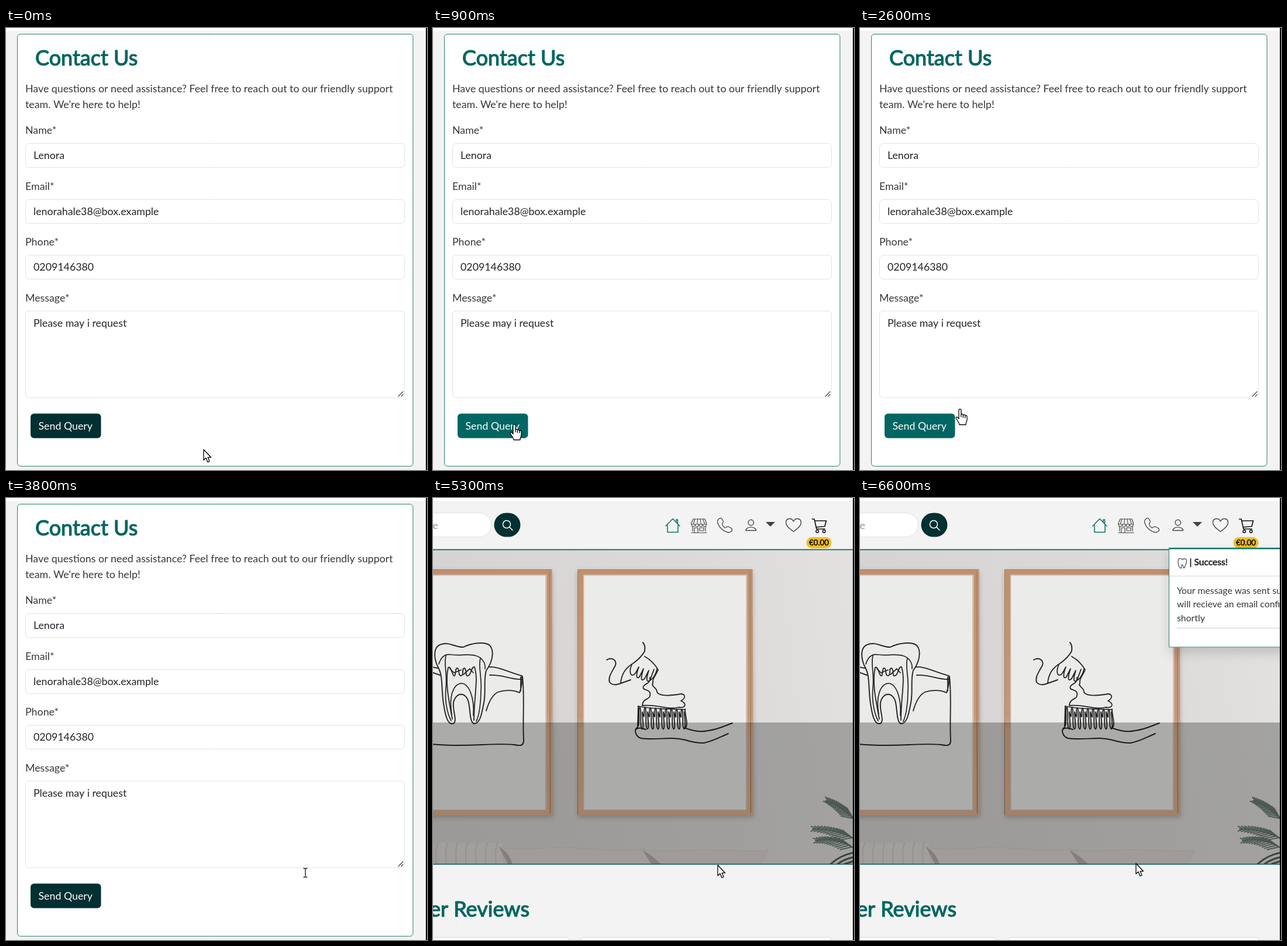
Animation of 720x756 px, one loop 7200 ms. Source, as an HTML page with a canvas:

```html
<!DOCTYPE html>
<html lang="en">
<head>
<meta charset="utf-8">
<title>Contact form</title>
<style>
html, body { margin: 0; width: 100%; height: 100%; overflow: hidden; background: #f3f3f3; }
canvas { display: block; width: 720px; height: 756px; }
</style>
</head>
<body>
<canvas id="stage" width="720" height="756"></canvas>
<script>
const ctx = document.getElementById('stage').getContext('2d');
const LOOP = 7200, STEP = 100, PAGE_SWITCH = 5300;
const TEAL = '#006660', DARK = '#003032', INK = '#212529', PAGE = '#f3f3f3';

const clamp = v => Math.max(0, Math.min(1, v));
const ramp = (t, a, b) => clamp((t - a) / (b - a));
const smooth = u => u * u * (3 - 2 * u);
const lerp = (a, b, u) => a + (b - a) * u;

function rect(x, y, w, h, fill) {
  ctx.fillStyle = fill;
  ctx.fillRect(x, y, w, h);
}

function box(x, y, w, h, r, fill, line) {
  ctx.beginPath();
  ctx.roundRect(x, y, w, h, r);
  ctx.fillStyle = fill;
  ctx.fill();
  if (line) {
    ctx.strokeStyle = line;
    ctx.lineWidth = 1;
    ctx.stroke();
  }
}

function text(str, x, y, size = 17.8, color = INK, bold = 0, align = 'left') {
  ctx.font = `400 ${size}px Lato, sans-serif`;
  ctx.textAlign = align;
  ctx.fillStyle = ctx.strokeStyle = color;
  ctx.fillText(str, x, y);
  if (bold) {
    ctx.lineWidth = bold;
    ctx.lineJoin = 'round';
    ctx.strokeText(str, x, y);
  }
}

function path(d, line, width = 1.5, fill) {
  const p = new Path2D(d);
  ctx.lineCap = ctx.lineJoin = 'round';
  if (fill) { ctx.fillStyle = fill; ctx.fill(p); }
  if (line) { ctx.strokeStyle = line; ctx.lineWidth = width; ctx.stroke(p); }
}

function shadowed(color, blur, dy, draw) {
  ctx.save();
  ctx.shadowColor = color;
  ctx.shadowBlur = blur;
  ctx.shadowOffsetY = dy;
  draw();
  ctx.restore();
}

// Contact form

function drawForm(t) {
  box(19.5, 10.5, 676.5, 739, 5, '#fff', '#2b8274');
  text('Contact Us', 50, 64, 36, TEAL, 1.2);
  text('Have questions or need assistance? Feel free to reach out to our friendly support', 33, 110, 17.8, '#33383c');
  text("team. We're here to help!", 33, 137, 17.8, '#33383c');

  const fields = [['Name*', 'Lenora'], ['Email*', 'lenorahale38@box.example'], ['Phone*', '0209146380']];
  fields.forEach(([label, value], i) => {
    const y = 95.7 * i;
    text(label, 33, 181 + y, 17.8, '#33383c');
    box(33.5, Math.round(197 + y) + .5, 648, 41, 6, '#fff', '#dee2e6');
    text(value, 47, 224 + y);
  });
  text('Message*', 33, 468, 17.8, '#33383c');
  box(33.5, 484, 648, 148.5, 6, '#fff', '#dee2e6');
  text('Please may i request', 47, 511);
  path('M671 630 L679 622 M676 630 L679 627', '#444', 1.2);

  const hover = ramp(t, 500, 700) * (1 - ramp(t, 2600, 2800));
  const green = lerp(48, 102, hover), blue = lerp(50, 100, hover);
  box(42, 659.5, 120.5, 42, 6, `rgb(0,${green},${blue})`);
  text('Send Query', 55.5, 687, 17.8, '#fff');
}

// Shop page

function drawHeader() {
  box(-60, 25.5, 159.5, 41, 20.5, '#fff', '#e2e2e2');
  text('e', 9, 53, 17.8, '#999', 0, 'right');
  box(104.5, 25.5, 45, 41, 20.5, DARK);
  path('M132.5 45 a6.5 6.5 0 1 1 -13 0 a6.5 6.5 0 1 1 13 0 M131 50 L136 55', '#fff', 1.5);

  const gray = '#444';
  path('M398 48 L410 35.5 L422 48 M401 46 V58.5 H419 V46 M416 41 V37 H418.5 V44', '#0b7068', 1.5);
  path('M445 36 H465 L467.5 43 V45 H442 V43 Z M444 48 V57 M466 48 V57 M442 59.5 H468 M447 59 V51 H453 V59 M456 51 H463 V56 H456 Z', gray, 1.2);
  for (let i = 0; i < 4; i++) path(`M${442 + i * 6.4} 45 a3.2 4 0 0 0 6.4 0 M${448 + i * 4.5} 36 L${445.4 + i * 6.4} 44`, gray, 1.1);
  path('M490 35 C487 37 486 40 487 43 C490 51 497 57 505 59 C508 59 511 57 511.5 55 C512 53 511 52 509 51 L505 49 C503 48.5 502 50 500 51 C497 50 495 47 494.5 44 C495 43 497 42 496.5 40 L494 35.5 C493 34 491 34 490 35 Z', gray, 1.3);
  path('M548.5 42 a4.7 4.7 0 1 1 -9.4 0 a4.7 4.7 0 1 1 9.4 0 M535 55.5 C535 48 552.5 48 552.5 55.5 Z', gray, 1.4);
  path('M569 41 H585 L577 49 Z', null, 0, gray);
  path('M616.5 57.5 C608 51 603.5 47 603.5 42 C603.5 34.5 613 33 616.5 40 C620 33 629.5 34.5 629.5 42 C629.5 47 625 51 616.5 57.5 Z', gray, 1.4);
  path('M648.5 36 H652 L656 53 H670 M653 39 H672.5 L670 48.5 L655 50', '#111', 1.7);
  path('M659.5 57 a2.3 2.3 0 1 1 -4.6 0 a2.3 2.3 0 1 1 4.6 0 M671 57 a2.3 2.3 0 1 1 -4.6 0 a2.3 2.3 0 1 1 4.6 0', '#111', 1.5);
  box(638.5, 67, 43, 19, 9.5, '#f4bd1b');
  text('€0.00', 660, 81, 13.3, '#111', .6, 'center');
}

function drawFrame(x, w) {
  // the wood keeps more of its light under the dark band
  const wood = ctx.createLinearGradient(0, 122, 0, 543);
  wood.addColorStop(0, '#bf906e');
  wood.addColorStop(.6, '#c4987a');
  wood.addColorStop(.65, '#d9ad8d');
  wood.addColorStop(1, '#deb292');
  shadowed('rgba(60,50,45,.3)', 9, 3, () =>
    path(`M${x} 122 H${x + w} L${x + w + 1.5} 543 H${x + 1} Z`, null, 0, wood));
  rect(x + 10, 131, w - 19, 403.5, '#d3c2b5');
  rect(x + 11.5, 133, w - 23, 400, '#ebebea');
  path(`M${x + .5} 542 V122.5 H${x + w - .5}`, '#a87b5d', 1);
  path(`M${x + w - 4} 126 L${x + w - 3} 538`, '#ab7f62', 1.5);
}

function drawTooth() {
  const ink = '#242424';
  path('M34 386 C25 388 21 372 18 352 C14 326 17 306 10 292 C2 278 -2 254 15 250 C30 246 38 256 52 255 C66 248 88 245 97 252 C106 262 101 282 91 295 C86 312 91 330 87 350 C83 372 80 386 70 386 C63 384 64 366 61 350 C57 331 39 331 35 350 C33 364 43 383 34 386', ink, 1.9);
  path('M10 284 C14 270 22 266 32 268 C48 270 62 266 74 270 C84 273 90 282 89 292 M22 270 C18 284 25 300 22 326 C20 346 24 368 31 381 M81 274 C77 290 84 306 82 330 C82 350 79 372 74 382', ink, 1.7);
  path('M33 378 C28 350 20 316 26 290 C31 286 33 306 37 304 C40 300 37 291 42 291 C46 293 42 304 48 304 C54 303 48 291 54 291 C59 295 54 306 60 304 C66 302 65 288 71 289 C78 310 70 340 70 380', ink, 1.8);
  path('M29 292 L36 299 L48 294 M52 302 L63 292 L69 299 M32 370 C27 340 34 319 48 317 C62 317 71 342 69 372', ink, 1.7);
  path('M96 289 C112 288 132 299 152 304 C153 314 151 325 148 333 C136 327 120 329 111 332 C101 337 95 350 91 364 M97 303 C116 301 134 311 151 310 M150 306 V330', ink, 1.8);
  path('M153 305 C157 340 153 380 155 413 C156 425 148 424 139 422 C100 418 60 427 -2 421 M-2 289 L8 291 M-2 298 L12 303', ink, 1.9);
}

function drawBrush() {
  const ink = '#242424';
  path('M297 277 C304 272 315 276 312 286 C306 298 299 306 302 315 C308 322 316 319 324 316 L338 311 M321 317 C322 302 330 290 342 283 C352 276 357 271 362 262 C363 255 362 250 359 247', ink, 1.9);
  path('M362 271 C371 276 380 285 385 294 C380 306 375 308 376 317 C372 322 384 325 383 332 C388 340 406 338 425 335 C434 337 430 344 424 347 C436 352 431 360 420 358 C400 363 380 352 358 355 C358 343 372 344 371 338 C374 325 356 331 360 322 C364 316 372 318 371 307', ink, 1.8);
  path('M340 285 C335 296 337 306 344 302 C348 298 350 292 352 289 C347 302 347 311 353 306 L360 292 C355 308 355 315 362 309 L369 295 C364 311 365 316 371 312 L378 293 M371 312 C376 310 382 300 383 293', ink, 1.8);
  // one strand looping up and down forms the bristles
  let d = 'M351 356 L350 391';
  for (let i = 0; i < 9; i++) {
    const x = 351 + i * 9, top = 358 + i * .5;
    d += ` C${x + 4} 388 ${x - 1} ${top} ${x + 3} ${top} C${x + 6} ${top + 2} ${x + 2} 395 ${x + 7} 395 C${x + 10} 394 ${x + 7} 376 ${x + 7} 366`;
  }
  path(d + ' M431 361 C431 374 437 386 432 393', ink, 1.9);
  path('M351 356 C375 362 405 360 431 362', ink, 1.6);
  path('M350 392 C343 396 346 408 356 411 C382 415 405 407 432 414 C444 418 455 419 463 419 C480 416 492 408 505 403 M346 397 C350 391 358 394 364 396 M430 393 C444 398 456 401 470 398 C488 396 500 389 512 385', ink, 1.9);
}

function drawFrond(x0, y0, cx, cy, x1, y1) {
  const green = '#4b5750';
  path(`M${x0} ${y0} Q${cx} ${cy} ${x1} ${y1}`, green, 2);
  for (let i = 1; i < 12; i++) {
    const u = i / 12, v = 1 - u;
    const x = v * v * x0 + 2 * u * v * cx + u * u * x1;
    const y = v * v * y0 + 2 * u * v * cy + u * u * y1;
    const len = 22 * (1 - u * .6);
    const a = Math.atan2(y1 - y, x1 - x);
    for (const side of [-.4, .45]) {
      path(`M${x} ${y} L${x + len * Math.cos(a + side)} ${y + len * Math.sin(a + side)}`, green, 2);
    }
  }
}

function drawSofa() {
  const seam = '#cfcbc6';
  rect(0, 590, 118, 36, '#dedbd6');
  for (let i = 0; i < 7; i++) path(`M${8 + i * 17} 590 Q${3 + i * 17} 606 ${6 + i * 17} 626`, seam, 2.5);
  path('M113 597 C145 606 190 596 235 598 C285 600 320 606 360 600 L372 626 H132 C126 615 122 605 113 597 Z', seam, 1, '#dcd8d3');
  path('M358 602 C400 606 440 600 490 602 C525 602 550 606 573 602 L560 626 H376 Z', seam, 1, '#dad6d1');
  path('M113 597 Q130 606 136 626 H128 Z M358 602 Q376 612 390 626 H374 Z', null, 0, '#b5afa8');
}

function drawHero() {
  ctx.save();
  ctx.beginPath();
  ctx.rect(0, 89, 718, 537);
  ctx.clip();
  const wall = ctx.createLinearGradient(0, 200, 718, 89);
  wall.addColorStop(0, '#d6d4d2');
  wall.addColorStop(.6, '#dcdad8');
  wall.addColorStop(1, '#e2e1df');
  rect(0, 89, 718, 537, wall);
  drawFrame(-96, 299.5);
  drawFrame(247, 299.5);
  drawTooth();
  drawBrush();
  drawSofa();

  rect(0, 384, 718, 242, 'rgba(0,0,0,.275)');
  drawFrond(722, 552, 700, 528, 673, 517);
  drawFrond(722, 584, 690, 566, 649, 566);
  drawFrond(722, 600, 690, 580, 654, 586);
  path('M680 626 Q698 610 722 606 M692 626 Q706 616 722 614 M704 626 L722 620', '#39443d', 3);
  ctx.restore();
  rect(0, 87.5, 718, 1.7, '#0c5f57');
  rect(0, 625.6, 718, 1.6, '#0c5f57');
}

function drawToast(alpha) {
  if (!alpha) return;
  ctx.globalAlpha = alpha;
  shadowed('rgba(0,0,0,.15)', 18, 9, () => rect(528, 85, 390, 170.5, '#fff'));
  rect(528, 85, 200, 2.6, '#0e7a68');
  path('M528.5 86 V255 H728', '#2b8274', 1);
  path('M547 119 C543 114 543 104 547 103.5 C549 103 550 105 552 105 C554 103.5 558 103 558.5 107 C559 112 556 114 555.5 118 C554 121 553 120 552.5 116 C552 113 550 113 550 116 C550 120 549 121 547 119 Z', '#333', 1.1);
  text('| Success!', 563.5, 115.2, 15.6, INK, .65);
  rect(529, 133, 190, 1, '#d3d6d8');
  text('Your message was sent successfully. You', 542, 164, 15.75, '#33383c');
  text('will recieve an email confirmation', 542, 187.3, 15.75, '#33383c');
  text('shortly', 542, 210.6, 15.75, '#33383c');
  rect(542, 222, 177, 1, '#c9cccf');
  ctx.globalAlpha = 1;
}

function drawShop(t) {
  drawHeader();
  drawHero();
  text('er Reviews', 165, 716, 36, TEAL, 1.2, 'right');
  box(-20, 751.5, 253, 30, 6, '#fff', '#d5d5d5');
  box(252.5, 751.5, 430, 30, 6, '#fff', '#d5d5d5');
  drawToast(ramp(t, 5400, 5600));
}

// Pointer

const pointers = {
  arrow: () => path('M0 0 V18 L4 14.3 L7 21.5 L10 20.2 L7.2 13.3 H12.5 Z', '#000', 1.3, '#fff'),
  hand: () => path('M-2 1.5 C-2 -.6 2 -.6 2 1.5 V9 C3 7.8 5.2 8 5.4 10 C6.5 9 8.6 9.2 8.7 11 C10 10 12 10.6 12 12.5 V18 C12 21 10 22 10 26.5 H-1 C-1 23 -5 19 -6.5 16 C-7.5 13.5 -5 12.6 -3.6 14.5 L-2 16.4 Z M2 9 V13 M5.4 10 V14 M8.7 11 V14.5', '#000', 1.3, '#fff'),
  beam: () => path('M-3 -7.5 H-1 L0 -6.5 L1 -7.5 H3 M0 -6.5 V6.5 M-3 7.5 H-1 L0 6.5 L1 7.5 H3', '#222', 1.4)
};

const track = [
  [0, 338, 721], [800, 139, 678], [2500, 139, 678], [2600, 171, 652],
  [2900, 365, 624], [3200, 512, 641], [5000, 512, 641], [5200, 489, 628],
  [5300, 487, 628], [5800, 472, 625], [LOOP, 472, 625]
];

function drawPointer(t) {
  const i = track.findIndex((p, k) => t >= p[0] && t < track[k + 1][0]);
  const [t0, x0, y0] = track[i], [t1, x1, y1] = track[i + 1];
  const k = ramp(t, t0, t1), u = i === 0 ? smooth(k) : k;
  const x = lerp(x0, x1, u), y = lerp(y0, y1, u);
  let kind = 'arrow';
  if (t < 2700 && x < 172) kind = 'hand';
  else if (t >= 2700 && t < 5100) kind = 'beam';
  ctx.save();
  ctx.translate(x, y);
  pointers[kind]();
  ctx.restore();
}

function draw(now) {
  const t = Math.floor((now % LOOP) / STEP) * STEP;
  rect(0, 0, 720, 756, PAGE);
  rect(0, 0, 720, 5, '#fff');
  if (t < PAGE_SWITCH) drawForm(t);
  else drawShop(t);
  drawPointer(t);
  rect(718, 0, 2, 756, '#000');
}

let start;
function tick(now) {
  start ??= now;
  draw(now - start);
  requestAnimationFrame(tick);
}
draw(0);
requestAnimationFrame(tick);
</script>
</body>
</html>
```
